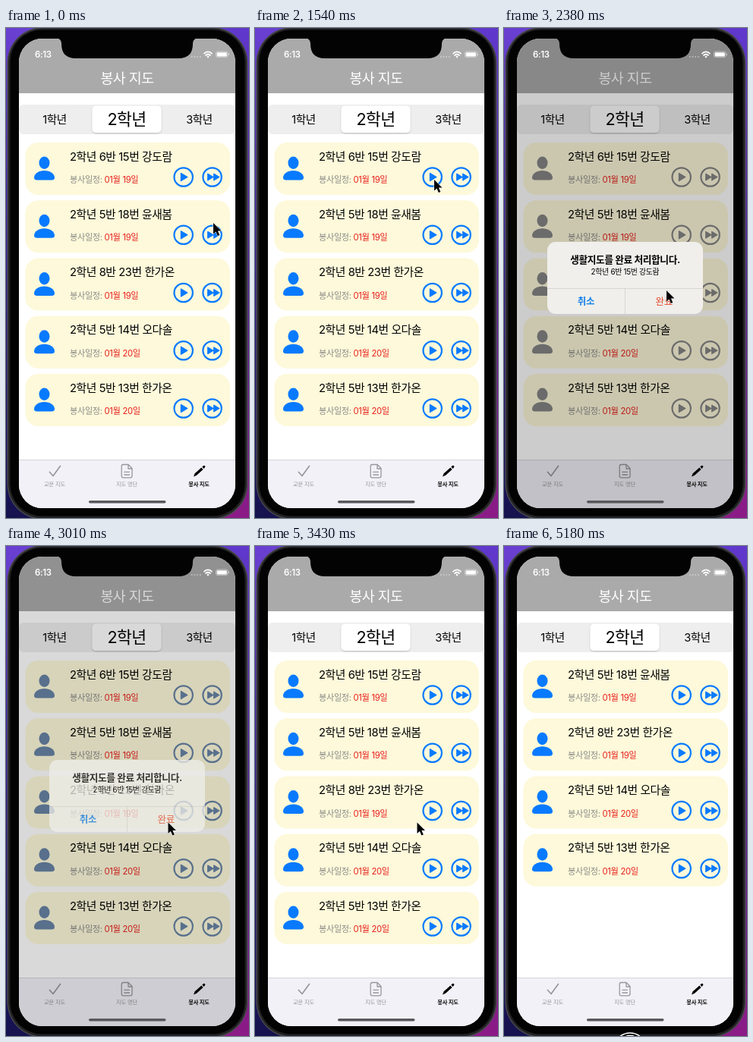
An HTML page for the animation above (5250 ms loop, 320 px wide and 646 px high).

```html
<!DOCTYPE html>
<html lang="ko">
<head>
<meta charset="utf-8">
<style>
html, body { margin: 0; width: 100%; height: 100%; overflow: hidden; background: #000; }
svg { display: block; width: 320px; height: 646px; }
text { font-family: Inter, "Noto Sans CJK KR", "Noto Sans CJK", sans-serif; letter-spacing: -.03em; }
.mid { text-anchor: middle; }
.bold { font-weight: 700; }
.ring { fill: none; stroke: currentColor; stroke-width: 2.2; }
.glyph { fill: currentColor; stroke: currentColor; stroke-width: 1.4; stroke-linejoin: round; }
.line { fill: none; stroke-linecap: round; stroke-linejoin: round; }
</style>
</head>
<body>
<svg viewBox="0 0 320 646">
  <defs>
    <linearGradient id="left" x2="0" y2="1">
      <stop stop-color="#6a40d2"/><stop offset=".45" stop-color="#3a2596"/><stop offset="1" stop-color="#15124e"/>
    </linearGradient>
    <linearGradient id="right" x2="0" y2="1">
      <stop stop-color="#6038cc"/><stop offset=".5" stop-color="#55249c"/><stop offset="1" stop-color="#8c1b86"/>
    </linearGradient>
    <clipPath id="screen"><rect x="17" y="14" width="285" height="619" rx="31"/></clipPath>
    <filter id="soft" x="-20%" y="-20%" width="140%" height="150%">
      <feDropShadow dx="0" dy="1" stdDeviation="1.2" flood-opacity=".22"/>
    </filter>
  </defs>

  <rect width="160" height="646" fill="url(#left)"/>
  <rect x="160" width="160" height="646" fill="url(#right)"/>
  <rect x="1.5" y="-1" width="317" height="649" rx="47" fill="#48484b"/>
  <rect x="3" y=".5" width="314" height="646" rx="45.5" fill="#222224"/>
  <rect x="5.5" y="2.5" width="309" height="641" rx="42" fill="#030303"/>

  <g clip-path="url(#screen)">
    <rect x="17" y="14" width="285" height="619" fill="#fff"/>
    <rect x="17" y="14" width="285" height="72" fill="#aaa"/>
    <text class="mid" x="159.5" y="73" font-size="18.4" fill="#fff">봉사 지도</text>

    <rect x="17" y="101" width="285" height="39" rx="6" fill="#eeeeef"/>
    <rect x="113.5" y="102.5" width="91" height="35.5" rx="5" fill="#fff" filter="url(#soft)"/>
    <g class="mid" font-size="14.6">
      <text x="64" y="125.5">1학년</text>
      <text x="159" y="128" font-size="21.6">2학년</text>
      <text x="254.5" y="125.5">3학년</text>
    </g>

    <g id="rows"></g>

    <rect x="17" y="569" width="285" height="64" fill="#f2f1f8"/>
    <path d="M17 569.5H302" stroke="#d6d5da"/>
    <g class="line" stroke="#98989c" stroke-width="1.7">
      <path d="M57.5 585.5L62 590.5L71.500 577.500"/>
      <path d="M154.500 575.500h6.500l5 5v10q0 2.300-2.300 2.300h-9.200q-2.300 0-2.300-2.300v-12.700q0-2.300 2.300-2.300zM161 576v5h5M155.800 585.300h6.700M155.800 589h6.700" stroke-width="1.300"/>
    </g>
    <path d="M247 591.500l1.600-4.300 8.700-7.700 2.300 2.500-8.600 7.800zM258.300 578.600l1.800-1.500q1-.6 1.800.2t.1 1.900l-1.500 1.700z"/>
    <g class="mid" font-size="7.300" fill="#98989c">
      <text x="64" y="604">교문 지도</text>
      <text x="159" y="604">지도 명단</text>
      <text class="bold" x="254" y="604" fill="#111">봉사 지도</text>
    </g>

    <rect id="dim" x="17" y="14" width="285" height="619"/>
    <rect x="109" y="623" width="101.500" height="3.600" rx="1.800" fill="#59595d"/>

    <text x="38" y="39" font-size="11.400" font-weight="600" fill="#fff">6:13</text>
    <path d="M244 38h13" stroke="#fff" stroke-opacity=".5" stroke-width="1.600" stroke-dasharray="1.600 2.100"/>
    <g class="line" stroke="#fff" stroke-width="1.700">
      <path d="M261 33.600q5-4.300 10 0M263 36q3-2.500 6 0"/>
      <circle cx="266" cy="38" r=".5"/>
    </g>
    <rect x="276.500" y="31" width="15.500" height="7.600" rx="2.200" fill="none" stroke="#fff" stroke-opacity=".55" stroke-width=".8"/>
    <rect x="277.700" y="32.200" width="13.100" height="5.200" rx="1.200" fill="#fff"/>
    <path d="M293.300 33.500v2.600" stroke="#fff" stroke-opacity=".6"/>

    <path d="M66 13Q73 14 73 21Q73 40 92 40H227Q246 40 246 21Q246 14 253 13Z" fill="#030303"/>

    <g id="alert">
      <rect x="57" y="282" width="205" height="95" rx="11" fill="#f0efeb"/>
      <path id="press" d="M160 344H262V366Q262 377 251 377H160Z" fill="#000" opacity=".08"/>
      <path d="M57 343.500H262M159.500 343.500V377" stroke="#d2d1cd" stroke-width=".8"/>
      <g class="mid">
        <text class="bold" x="159.500" y="309.500" font-size="12.700">생활지도를 완료 처리합니다.</text>
        <text id="note" x="159.500" y="325.300" font-size="9.900"></text>
        <text class="bold" x="108" y="365" font-size="12.500" fill="#1580e8">취소</text>
        <text x="210.700" y="365" font-size="12.500" fill="#e5482d">완료</text>
      </g>
    </g>
  </g>

  <g id="stop" stroke="#fff" stroke-width="1.300">
    <circle cx="166" cy="663.500" r="21.500" fill="#050505"/>
    <circle cx="166" cy="663.500" r="18" fill="none"/>
  </g>
  <path id="cursor" d="M0 0V14.500L3.400 11.400L5.800 17L8.300 16L5.900 10.500H10.500Z" stroke="#fff" stroke-width="1" paint-order="stroke"/>
</svg>

<script>
const LOOP = 5250, STEP = 70, PITCH = 76.25;
const OPEN = 1540, PRESS = 2800, CLOSE = 2940, REMOVE = 3850, STOP = 5180;
const $ = id => document.getElementById(id);

const students = [
  ['2학년 6반 15번 강도람', '01월 19일'],
  ['2학년 5반 18번 윤새봄', '01월 19일'],
  ['2학년 8반 23번 한가온', '01월 19일'],
  ['2학년 5반 14번 오다솔', '01월 20일'],
  ['2학년 5반 13번 한가온', '01월 20일']
];

const row = ([name, date], i) => `
  <g transform="translate(0 ${i * PITCH})">
    <rect x="25.500" y="151" width="269.500" height="69" rx="17" fill="#fdf9da"/>
    <ellipse cx="50.500" cy="177.700" rx="7" ry="8.200" fill="currentColor"/>
    <path d="M37 197.500C37 192 43 188 50.500 188S64 192 64 197.500Q64 200.500 60 200.500H41Q37 200.500 37 197.500Z" fill="currentColor"/>
    <text x="84" y="174.700" font-size="14.800">${name}</text>
    <text x="84" y="204" font-size="11.200" fill="#8b8b88">봉사일정:</text>
    <text x="129.500" y="204" font-size="11.300" fill="#e8201c">${date}</text>
    <circle class="ring" cx="233.700" cy="196.500" r="12.200"/>
    <path class="glyph" d="M230.500 191.500v10l8.300-5z"/>
    <circle class="ring" cx="271.600" cy="196.500" r="12.200"/>
    <path class="glyph" d="M265.800 192.300v8.400l7-4.200zM273.800 192.300v8.400l7-4.200z"/>
  </g>`;

$('rows').innerHTML = students.map(row).join('');
$('note').textContent = students[0][0];

// Pointer path: time, x, y
const path = [
  [0, 273, 257], [980, 236, 200], [1540, 236, 200], [1610, 235, 200], [1820, 235, 200],
  [2030, 202, 243], [2170, 199, 282], [2380, 214, 346], [2520, 213.5, 364.5],
  [4270, 213.5, 364.5], [4760, 204, 652], [LOOP, 204, 652]
];

function pointer(t) {
  const i = path.findIndex(p => p[0] > t);
  const [t0, x0, y0] = path[i - 1], [t1, x1, y1] = path[i];
  const k = (t - t0) / (t1 - t0);
  return [x0 + (x1 - x0) * k, y0 + (y1 - y0) * k];
}

// Critically damped spring, n in steps
const spring = n => n <= 0 ? 0 : n >= 7 ? 1 : 1 - (1 + .95 * n) * Math.exp(-.95 * n);

function draw(t) {
  const opened = t > OPEN ? spring((t - OPEN) / STEP + 2) : 0;
  const shown = opened * (1 - spring((t - CLOSE) / STEP));
  const scale = 1 + .14 * (1 - opened);
  const tint = [8, 122, 255].map(c => Math.round(c + (134 - c) * shown));

  $('rows').style.color = `rgb(${tint})`;
  $('dim').setAttribute('opacity', .2 * shown);
  $('alert').setAttribute('opacity', shown);
  $('alert').setAttribute('transform', `translate(159.5 329.5) scale(${scale}) translate(-159.5 -329.5)`);
  $('press').style.display = t >= PRESS && t < CLOSE ? '' : 'none';

  const removed = t >= REMOVE;
  $('rows').firstElementChild.style.display = removed ? 'none' : '';
  $('rows').setAttribute('transform', `translate(0 ${removed ? -PITCH : 0})`);
  $('stop').style.display = t >= STOP ? '' : 'none';
  $('cursor').setAttribute('transform', `translate(${pointer(t)})`);
}

const start = performance.now();
function tick() {
  const t = (performance.now() - start) % LOOP;
  draw(Math.floor(t / STEP) * STEP);
  requestAnimationFrame(tick);
}
tick();
</script>
</body>
</html>
```
